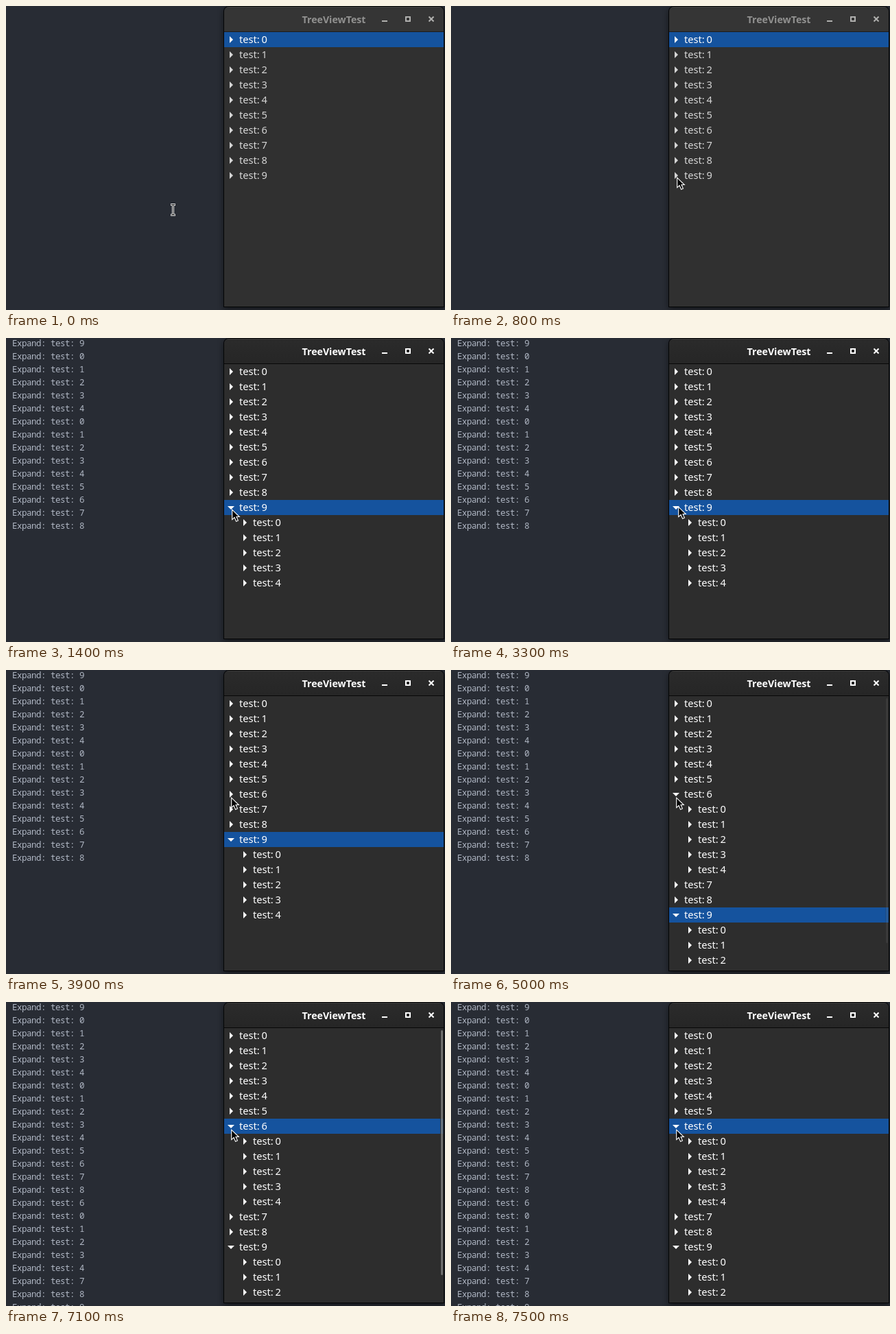
An HTML page for the animation above (8.5 s loop, 640 by 443 pixels).

```html
<!DOCTYPE html>
<html lang="en">
<head>
<meta charset="utf-8">
<title>TreeViewTest</title>
<style>
  html, body { margin: 0; width: 100%; height: 100%; overflow: hidden; background: #282c34; }
  #frame {
    position: absolute; left: 318px; top: 1px; width: 320px; height: 437px;
    border-radius: 7px 7px 0 0;
    box-shadow: 0 3px 9px 1px rgba(0,0,0,.5), 0 0 0 1px rgba(0,0,0,.85);
  }
  svg { position: absolute; left: 0; top: 0; display: block; }
  text { white-space: pre; }
  #log { font: 12.5px "Noto Sans Mono", "DejaVu Sans Mono", monospace; letter-spacing: -.5px; fill: #b0b7c4; }
  #rows { font: 14.67px "Noto Sans", "Open Sans", sans-serif; word-spacing: -1px; }
  #title { font: bold 14.2px "Noto Sans", "Open Sans", sans-serif; text-anchor: middle; }
</style>
</head>
<body>
<div id="frame"></div>
<svg width="640" height="443" viewBox="0 0 640 443">
  <defs>
    <linearGradient id="bar" x1="0" y1="0" x2="0" y2="1">
      <stop offset="0" stop-color="#2b2b2b"/>
      <stop offset="1" stop-color="#262626"/>
    </linearGradient>
    <clipPath id="shape"><path d="M318 438V8a7 7 0 0 1 7-7H631a7 7 0 0 1 7 7V438Z"/></clipPath>
  </defs>
  <g id="log"></g>
  <g clip-path="url(#shape)">
    <rect id="list" x="318" y="38" width="320" height="400"/>
    <rect id="header" x="318" y="1" width="320" height="36"/>
    <rect x="318" y="1" width="320" height="1" fill="#eeeeec" opacity=".07"/>
    <rect id="edge" x="318" y="37" width="320" height="1"/>
    <text id="title" x="478" y="25">TreeViewTest</text>
    <g id="buttons" fill="none" stroke-width="2">
      <path d="M548 22h8"/>
      <path d="M583 16h6v6h-6z"/>
      <path d="M616.5 15.5l7 7m0-7l-7 7"/>
    </g>
    <g id="rows"></g>
    <g id="scroll">
      <rect x="633" y="41" width="5" height="357" fill="#2a2a2a"/>
      <rect x="634" y="41" width="3" height="357" rx="1.5" fill="#7c7c7a"/>
    </g>
  </g>
  <g id="beam" fill="none">
    <path d="M240 289.5h7M240 304.5h7M243.5 290v14" stroke="#fff" stroke-width="3"/>
    <path d="M240.5 289.5h6M240.5 304.5h6M243.5 290v14" stroke="#000"/>
  </g>
  <path id="arrow" d="M.7 1.2V15.6L4.1 12.5L6.6 18.2L9.4 17L7 11.5H11.3Z" fill="#000" stroke="#fff" stroke-width="1.1"/>
</svg>
<script>
const LOOP = 8500, STEP = 100, ROW = 22;
const $ = id => document.getElementById(id);
const set = (id, name, value) => $(id).setAttribute(name, value);
const clamp = v => Math.max(0, Math.min(1, v));
const smooth = v => v * v * (3 - 2 * v);
const easeOut = v => 1 - (1 - v) ** 3;
const mix = (a, b, p) => a + (b - a) * p;

const firstLog = [..."901234012345678"];
const secondLog = [..."601234789"];

function logMarkup(t) {
  const lines = t < 1400 ? [] : t < 5200 ? firstLog : firstLog.concat(secondLog);
  return lines.map((n, i) => `<text x="9" y="${12 + 19 * i}">Expand: test: ${n}</text>`).join("");
}

function rowMarkup(n, index, depth, open, selected, color) {
  const x = 318 + depth * 20, y = 38 + index * ROW;
  const tri = open ? `M${x + 5} ${y + 9}h10l-5 5z` : `M${x + 8} ${y + 6}v10l5-5z`;
  const band = selected ? `<rect x="318" y="${y}" width="320" height="${ROW}" fill="#15539e"/>` : "";
  const ink = selected ? "#fff" : color;
  return `${band}<path d="${tri}" fill="${ink}"/><text x="${x + 22}" y="${y + 16}" fill="${ink}">test: ${n}</text>`;
}

function treeMarkup(t, color) {
  const open = { 9: t >= 1200, 6: t >= 5000 };
  const selected = t < 1200 ? 0 : t < 5100 ? 9 : 6;
  let out = "", index = 0;
  for (let n = 0; n < 10; n++) {
    out += rowMarkup(n, index++, 0, open[n], n === selected, color);
    for (let c = 0; open[n] && c < 5; c++) out += rowMarkup(c, index++, 1, false, false, color);
  }
  return out;
}

function pointer(t) {
  if (t < 3300) {
    const p = smooth(clamp(t / 800));
    return [mix(243, 329, p), mix(297, 249, p)];
  }
  const p = clamp((t - 3200) / 700), s = smooth(p);
  return [mix(329, 328, s) + 5 * Math.sin(Math.PI * p), mix(249, 185, s)];
}

function draw(t) {
  const active = t >= 1200;
  set("list", "fill", active ? "#2d2d2d" : "#303030");
  set("header", "fill", active ? "url(#bar)" : "#353535");
  set("edge", "fill", active ? "#070707" : "#1c1c1c");
  set("title", "fill", active ? "#fff" : "#919190");
  set("buttons", "stroke", active ? "#fff" : "#b0b0ae");
  $("log").innerHTML = logMarkup(t);
  $("rows").innerHTML = treeMarkup(t, active ? "#fff" : "#d5d5d5");

  const shown = easeOut(clamp((t - 4970) / 500)) - easeOut(clamp((t - 7070) / 500));
  set("scroll", "opacity", shown < 0.01 ? 0 : shown);

  const [x, y] = pointer(t).map(Math.round);
  const overText = x < 317;
  set("beam", "visibility", overText ? "visible" : "hidden");
  set("arrow", "visibility", overText ? "hidden" : "visible");
  set("beam", "transform", `translate(${x - 243} ${y - 297})`);
  set("arrow", "transform", `translate(${x} ${y})`);
}

let start = null, last = -1;
function tick(now) {
  if (start === null) start = now;
  const t = Math.floor((now - start) % LOOP / STEP) * STEP;
  if (t !== last) draw(last = t);
  requestAnimationFrame(tick);
}
draw(0);
requestAnimationFrame(tick);
</script>
</body>
</html>
```
